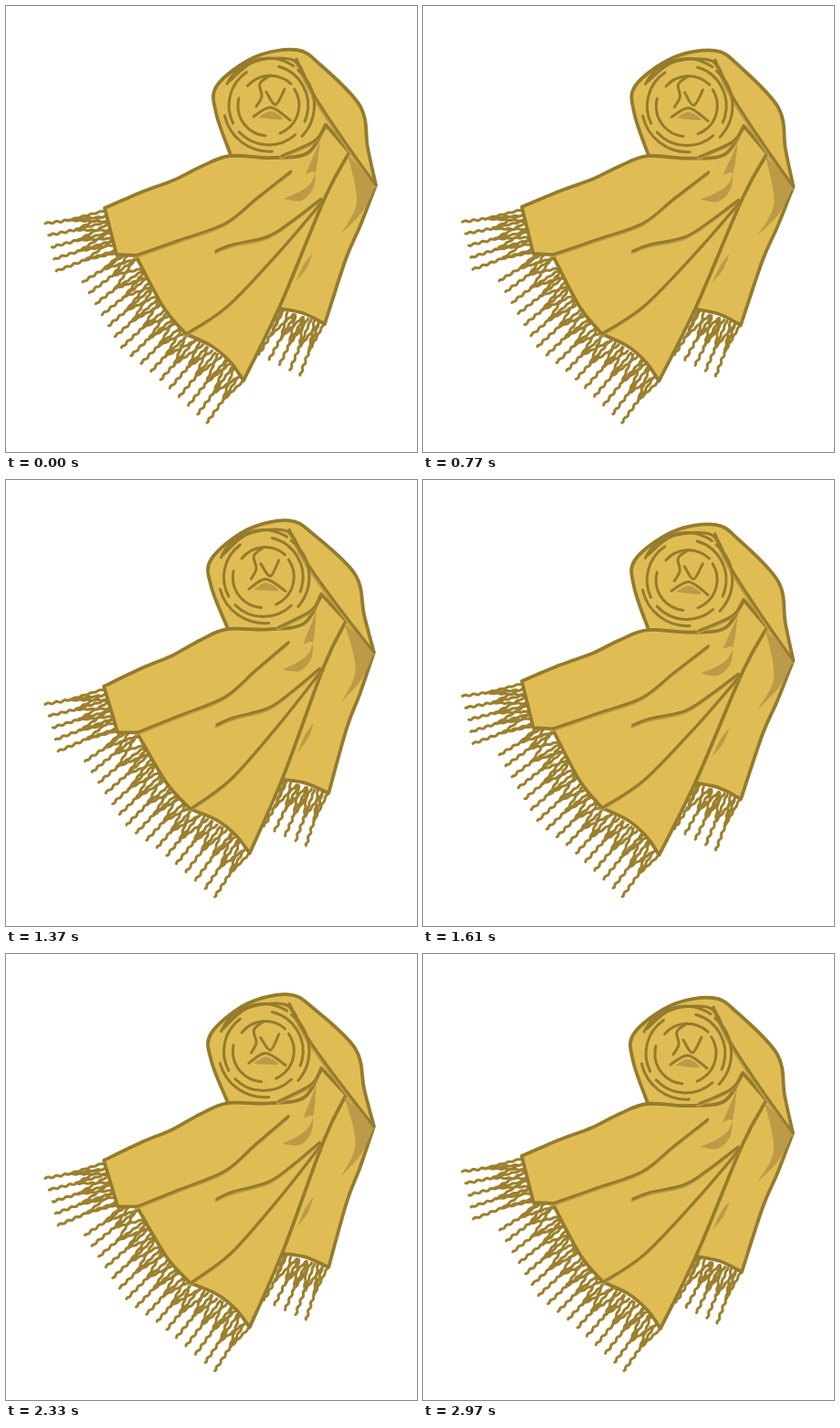
Recreate the animation shown at these times as an HTML page with a canvas. Size 450 by 488 pixels, loop 3010 ms.

```html
<!DOCTYPE html>
<html>
<head>
<meta charset="utf-8">
<style>
html, body { margin: 0; width: 100%; height: 100%; overflow: hidden; background: #fff; }
canvas { display: block; }
</style>
</head>
<body>
<canvas id="stage" width="450" height="488"></canvas>
<script>
const ctx = document.getElementById('stage').getContext('2d');
const GOLD = '#e0bd54', LINE = '#957b2d', SHADE = '#bb9b48', FRINGE = '#9d802d';

let seed = 11;
const random = () => (seed = seed * 16807 % 2147483647) / 2147483647;
const spread = size => (random() - 0.5) * size;

const parse = text => text.trim().split(' ').map(p => p.split(',').map(Number));
const mix = (a, b, k) => a.map((v, i) => v + (b[i] - v) * k);
const dist = (a, b) => Math.hypot(b[0] - a[0], b[1] - a[1]);

// Smooth path through the points; a slash after a point makes it a corner.
function curve(text) {
  const path = new Path2D();
  let corner;
  for (const part of text.split('/')) {
    const p = parse(part);
    if (corner) p.unshift(corner);
    else path.moveTo(...p[0]);
    for (let i = 0; i < p.length - 1; i++) {
      const a = p[i - 1] || p[i], b = p[i], c = p[i + 1], d = p[i + 2] || c;
      path.bezierCurveTo(b[0] + (c[0] - a[0]) / 6, b[1] + (c[1] - a[1]) / 6,
        c[0] - (d[0] - b[0]) / 6, c[1] - (d[1] - b[1]) / 6, ...c);
    }
    corner = p[p.length - 1];
  }
  return path;
}

// Point at fraction s of a polyline's length.
function along(points, s) {
  const lens = points.slice(1).map((p, i) => dist(points[i], p));
  let left = Math.max(0, Math.min(1, s)) * lens.reduce((a, b) => a + b);
  let i = 0;
  while (i < lens.length - 1 && left > lens[i]) left -= lens[i++];
  return mix(points[i], points[i + 1], left / lens[i]);
}

function wavy(path, a, b, size) {
  const len = dist(a, b), phase = random() * 6;
  const nx = (a[1] - b[1]) / len, ny = (b[0] - a[0]) / len;
  path.moveTo(...a);
  for (let d = 1.5; d < len; d += 1.5) {
    const w = size * Math.sin(d / 1.5 + phase), [x, y] = mix(a, b, d / len);
    path.lineTo(x + nx * w, y + ny * w);
  }
  path.lineTo(...b);
}

// Each tassel has a twisted end that splits into threads up to the hem.
function fringe(count, hemText, tipText) {
  const hem = parse(hemText), tips = parse(tipText), path = new Path2D();
  for (let i = 0; i < count; i++) {
    const tip = along(tips, i / (count - 1)), s = (i + 0.5) / count;
    const fork = mix(tip, along(hem, s), 0.45 + spread(0.12));
    wavy(path, tip, fork, 0.9);
    for (const side of [-0.8, 0, 0.8])
      wavy(path, fork, along(hem, s + (side + spread(0.5)) / count), 0.5);
  }
  return path;
}

// Broken rings of cloth around the middle of the roll.
function roll() {
  const path = new Path2D();
  for (const r of [50, 44, 33])
    for (let i = 0; i < 3; i++) {
      const from = 2.1 * i + r / 9 + spread(0.4), to = from + 1.6 + spread(0.4);
      const x = 288 + spread(3), y = 108 + spread(3);
      path.moveTo(x + r * Math.cos(from), y + r * Math.sin(from));
      path.ellipse(x, y, r, r, 0, from, to);
    }
  return path;
}

const fringes = [
  fringe(5, '108,224 121,270', '43,238 50,262 55,290'),
  fringe(16, '124,273 141,275 172,330 196,358 245,390 260,410', '84,302 128,376 162,402 220,456'),
  fringe(5, '301,333 348,348', '277,381 322,404')
];

const panels = [
  '246,163 230,117 231,87 272,56 318,48 345,65 388,110 396,155 405,196 / 388,240 372,277 349,348 / 325,336 300,331 / 246,163',
  '108,221 150,203 185,190 215,175 245,164 290,166 330,161 350,130 / 376,160 / 350,208 300,328 260,410 / 246,390 225,372 197,359 / 172,329 142,273 / 121,272 / 108,221'
].map(curve);

const shades = [
  '344,147 328,184 / 338,182 336,200 323,213 304,211 / 335,192 344,147',
  '374,162 405,196 / 390,225 367,249 / 384,214 374,162',
  '276,122 290,115 303,124 276,122',
  '317,302 326,283 336,270 / 329,287 317,302'
].map(curve);

const folds = [
  '142,273 190,256 240,238 275,210 312,181',
  '230,268 248,261 287,252 315,234 345,211',
  '197,359 243,328 300,268 347,213',
  '350,132 337,148 302,164',
  '318,58 337,97 370,147 405,196'
].map(curve);

const curls = [
  roll(),
  '245,82 272,61 314,59 330,84',
  '289,76 278,85 280,99 274,110',
  '285,94 295,108 305,91',
  '271,121 290,111 311,125'
].map(p => p instanceof Path2D ? p : curve(p));

function strokeAll(paths, color, width) {
  ctx.strokeStyle = color;
  ctx.lineWidth = width;
  paths.forEach(p => ctx.stroke(p));
}

function fillAll(paths, color) {
  ctx.fillStyle = color;
  paths.forEach(p => ctx.fill(p));
}

const LOOP = 3010, STEP = 40, PERIOD = 2970 / 7;
const swing = t => 0.031 * Math.cos(2 * Math.PI * (t / PERIOD - 0.86));

// Steps of 40 ms, with a pause between 320 and 610 ms.
function stepped(t) {
  return t < 610 ? Math.min(320, Math.floor(t / STEP) * STEP)
    : 610 + Math.floor((t - 610) / STEP) * STEP;
}

function draw(t) {
  ctx.setTransform(1, 0, 0, 1, 0, 0);
  ctx.fillStyle = '#fff';
  ctx.fillRect(0, 0, 450, 488);
  ctx.translate(225, 244);
  ctx.rotate(swing(stepped(t)) - swing(0));
  ctx.translate(-225, -244);
  ctx.lineCap = ctx.lineJoin = 'round';
  strokeAll(fringes, FRINGE, 3);
  for (const panel of panels) {
    fillAll([panel], GOLD);
    strokeAll([panel], LINE, 3.8);
  }
  fillAll(shades, SHADE);
  // Soft shadow just below every fold.
  ctx.translate(-1, 2);
  strokeAll(folds, SHADE, 3);
  ctx.translate(1, -2);
  strokeAll([...folds, ...curls], LINE, 3);
}

const start = performance.now();
function tick() {
  draw((performance.now() - start) % LOOP);
  requestAnimationFrame(tick);
}
tick();
</script>
</body>
</html>
```
